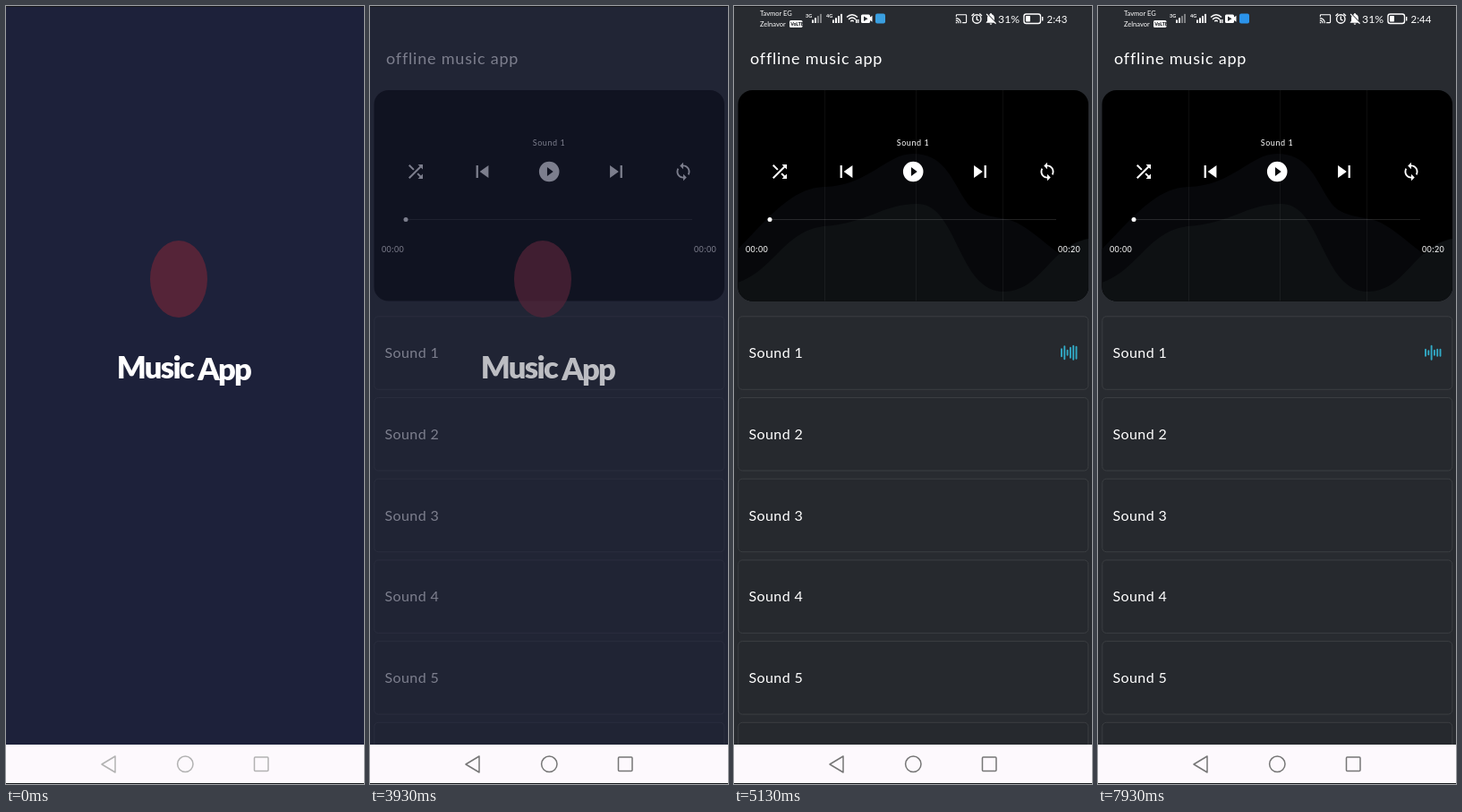
Recreate the animation shown at these times as an HTML page. Size 400 px wide and 869 px high, loop 8000 ms.

```html
<!DOCTYPE html>
<html lang="en">
<head>
<meta charset="utf-8">
<title>Music App</title>
<style>
  html, body { margin: 0; width: 100%; height: 100%; overflow: hidden; background: #1d213a; }
  svg { display: block; width: 100%; height: 100%; font-family: Lato, sans-serif; fill: #fff; }
  .row { fill: #26292e; stroke: #3b3e42; }
  .row-label { font-size: 16px; letter-spacing: .4px; }
  .small { font-size: 9px; letter-spacing: .4px; }
  .line { fill: none; stroke: #fff; }
  #equalizer { fill: none; stroke: #32aac6; stroke-width: 1.9; stroke-linecap: round; }
</style>
</head>
<body>
<svg viewBox="0 0 400 869">
  <defs>
    <clipPath id="card"><rect x="4.5" y="94" width="391.5" height="235.5" rx="16"/></clipPath>
  </defs>
  <rect width="400" height="869" fill="#1d213a"/>

  <g id="app">
    <rect width="400" height="826" fill="#282b30"/>
    <text x="18" y="65" font-size="18" letter-spacing=".8">offline music app</text>
    <g clip-path="url(#card)">
      <rect y="90" width="400" height="245" fill="#000"/>
      <g id="waves">
        <path fill="#07080b" d="M4 272C40 235 65 203 101 202C150 201 170 165 200 165C238 165 245 200 262 222C276 238 300 234 316 242C335 252 350 268 366 278L396 300V330H4Z"/>
        <path fill="#0e1113" d="M4 309C45 295 55 252 100 246C150 243 165 221 205 221C250 221 250 319 301 319C344 319 352 268 396 260V330H4Z"/>
        <path class="line" stroke-opacity=".05" d="M101.500 94V330M203.500 94V330M300.500 94V330"/>
      </g>
    </g>
    <text x="200" y="155.500" font-size="9" letter-spacing=".55" text-anchor="middle">Sound 1</text>
    <g id="controls"></g>
    <path class="line" stroke-opacity=".13" d="M40 238.500H360"/>
    <circle cx="40" cy="238.500" r="2.500"/>
    <text class="small" x="13" y="274.500">00:00</text>
    <text class="small" id="duration" x="362" y="274.500">00:00</text>
    <g id="rows"></g>
    <path id="equalizer"/>

    <g id="status">
      <text x="29" y="11" font-size="7.500">Tavmor EG</text>
      <text x="29" y="23" font-size="7.500">Zelnavor</text>
      <rect x="62" y="16" width="14.500" height="8" rx="1.500"/>
      <text x="63.200" y="22.200" font-size="5.200" font-weight="900" fill="#282b30">VoLTE</text>
      <text x="80" y="13" font-size="5.500" font-weight="700">3G</text>
      <text x="103" y="13" font-size="5.500" font-weight="700">4G</text>
      <g id="signals"></g>
      <path class="line" stroke-width="1.500" d="M126 12.500Q132 7 138 12.500M128 15Q132 11 136 15M130.300 17.200Q132 15.500 133.700 17.200"/>
      <path d="M136 15h1.500v4H136zM138.200 15h1.300v4h-1.300z"/>
      <path d="M143.500 9.500h7q1.500 0 1.500 1.500v1.500l2.500-1.800v7.100l-2.500-1.800V17.500q0 1.500-1.500 1.500h-7q-1.500 0-1.500-1.500V11q0-1.500 1.500-1.500z"/>
      <path fill="#282b30" d="M145 11.500l4.500 2.700-4.500 2.700z"/>
      <rect id="badge" x="158" y="8.500" width="11" height="11" rx="2"/>
      <g class="line" stroke-width="1.400">
        <circle cx="271.300" cy="14.500" r="4.700"/>
        <path d="M271.300 11.500V15L273.500 16.200M265.500 11L268.300 8.500M274.300 8.500L277 11"/>
        <rect x="324" y="9" width="18.500" height="10.500" rx="2.500"/>
        <path d="M344.700 12V16.500"/>
      </g>
      <rect x="326" y="11" width="5" height="6.500" rx=".8"/>
      <text x="295" y="18.500" font-size="12.300">31%</text>
      <text id="clock" x="349.500" y="18.500" font-size="11.500">2:43</text>
    </g>
  </g>

  <g id="splash">
    <ellipse cx="193" cy="305" rx="32" ry="43" fill="#552438"/>
    <text x="198.500" y="415.500" font-size="34.500" font-weight="900" letter-spacing="-1.700" text-anchor="middle">Music <tspan dy="2">App</tspan></text>
  </g>

  <rect y="825" width="400" height="44" fill="#fdf9fd"/>
  <g id="nav" fill="none" stroke-width="1.500" stroke-linejoin="round">
    <path d="M122 838V856L107 847Z"/>
    <circle cx="200.300" cy="846.800" r="8.700"/>
    <rect x="277.500" y="839" width="15.500" height="15.500" rx="1"/>
  </g>
  <path fill="#17181c" d="M0 0H400V1H0ZM0 868H400V869H0Z"/>
</svg>
<script>
const LOOP = 8000;
const $ = id => document.getElementById(id);
const setAttr = (id, name, value) => $(id).setAttribute(name, value);

// Icons use a 24-unit grid centred on (x, y).
const icon = (x, y, scale, d) =>
  `<path transform="translate(${x} ${y}) scale(${scale}) translate(-12 -12)" d="${d}"/>`;

$('controls').innerHTML =
  icon(51, 185, 1, 'M10.59 9.17L5.41 4 4 5.41l5.17 5.17 1.42-1.41zM14.5 4l2.04 2.04L4 18.59 5.41 20 17.96 7.46 20 9.5V4h-5.5zm.33 9.41l-1.41 1.41 3.13 3.13L14.5 20H20v-5.5l-2.04 2.04-3.13-3.13z') +
  icon(125.5, 185, 1.15, 'M6 6h2v12H6zm3.5 6l8.5 6V6z') +
  icon(200.2, 185, 1.13, 'M12 2a10 10 0 1 0 0 20a10 10 0 1 0 0-20zm-2 14.5v-9l6 4.5z') +
  icon(275, 185, 1.15, 'M6 18l8.5-6L6 6v12zM16 6v12h2V6h-2z') +
  icon(350, 185, .94, 'M12 4V1L8 5l4 4V6c3.31 0 6 2.69 6 6 0 1.01-.25 1.97-.7 2.8l1.46 1.46C19.54 15.03 20 13.57 20 12c0-4.42-3.58-8-8-8zm0 14c-3.31 0-6-2.69-6-6 0-1.01.25-1.97.7-2.8L5.24 7.74C4.46 8.97 4 10.43 4 12c0 4.42 3.58 8 8 8v3l4-4-4-4v3z');

$('status').insertAdjacentHTML('beforeend',
  icon(254, 14.2, .56, 'M21 3H3Q1 3 1 5v3h2V5h18v14h-7v2h7q2 0 2-2V5q0-2-2-2zM1 18v3h3c0-1.66-1.34-3-3-3zm0-4v2c2.76 0 5 2.24 5 5h2c0-3.87-3.13-7-7-7zm0-4v2c4.97 0 9 4.03 9 9h2c0-6.08-4.93-11-11-11z') +
  icon(287, 14.2, .66, 'M20 18.69L5.27 3.49 4 4.76l2.8 2.8Q6 9 6 11v5l-2 2v1h13.73l2 2L21 19.72zM12 22q2 0 2-2h-4q0 2 2 2zm6-7.32V11c0-3.08-1.64-5.64-4.5-6.32V4q0-1.5-1.5-1.5T10.500 4v.68L8.7 5.400z'));

for (const left of [87, 110]) {
  for (let i = 0; i < 4; i++) {
    const height = 3.5 + i * 2.2;
    const opacity = left === 87 && i > 1 ? .4 : 1;
    $('signals').innerHTML +=
      `<rect x="${left + i * 3}" y="${19 - height}" width="2" height="${height}" opacity="${opacity}"/>`;
  }
}

for (let i = 0; i < 6; i++) {
  const y = 346.8 + i * 90.7;
  $('rows').innerHTML +=
    `<rect class="row" x="4.800" y="${y}" width="391" height="81.500" rx="4.500"/>` +
    `<text class="row-label" x="16.500" y="${y + 46.5}">Sound ${i + 1}</text>`;
}

// Each bar swings between two heights, with its own sideways drift.
const BARS = [[9, 10, 3], [6, 16, -2], [17, 7, 2], [7, 13, 4], [9, 17, -3], [9, 15, -4]];
function equalizerPath(t) {
  const phase = (t - 6330) / 800 * 2 * Math.PI;
  return BARS.map(([from, to, drift], i) => {
    const height = (from + to) / 2 + (from - to) / 2 * Math.cos(phase) + drift * Math.sin(phase);
    const half = Math.max(1, height / 2 - .95);
    return `M${366 + i * 3.3} ${387.3 - half}v${half * 2}`;
  }).join('');
}

const clamp = x => Math.max(0, Math.min(1, x));

function render(t) {
  const opening = t >= 3930, opened = t >= 4000;
  setAttr('app', 'opacity', opened ? 1 : opening ? .42 : 0);
  setAttr('splash', 'opacity', opened ? 0 : opening ? .7 : 1);

  const shade = t < 70 ? 178 : t < 130 ? 158 : t < 200 ? 136 : 118;
  setAttr('nav', 'stroke', `rgb(${shade},${shade},${shade})`);

  setAttr('waves', 'opacity', clamp((t - 4060) / 270));
  setAttr('status', 'opacity', t >= 4130 ? 1 : 0);
  setAttr('badge', 'fill', t < 5670 ? '#3a9fe0' : '#2b93ea');
  $('duration').textContent = t < 4800 ? '00:00' : '00:20';
  $('clock').textContent = t < 7400 ? '2:43' : '2:44';

  setAttr('equalizer', 'opacity', t >= 4130 ? 1 : 0);
  setAttr('equalizer', 'd', equalizerPath(t));
}

const start = performance.now();
function tick() {
  render((performance.now() - start) % LOOP);
  requestAnimationFrame(tick);
}
tick();
</script>
</body>
</html>
```
